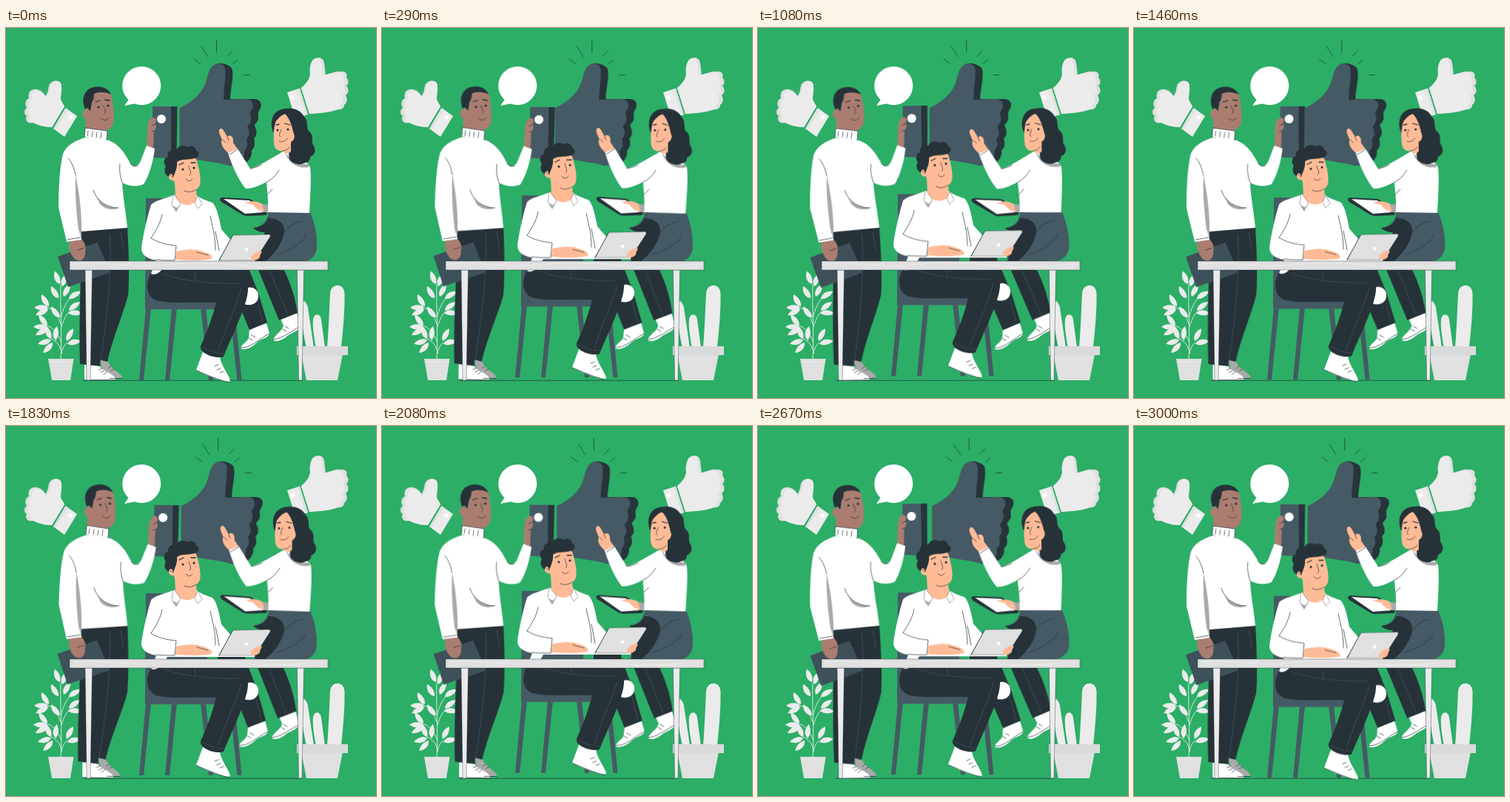
An HTML page that plays this animation: 500x500 px, repeating every 3040 ms.

```html
<!DOCTYPE html>
<html lang="en">
<head>
<meta charset="utf-8">
<title>Team giving a thumbs up</title>
<style>
html, body { margin: 0; width: 100%; height: 100%; overflow: hidden; background: #2cae67; }
svg { display: block; width: 100vw; height: 100vh; }
.white { fill: #fff; }
.pale { fill: #ebebeb; }
.light { fill: #e0e0e0; }
.grey { fill: #a9a9a9; }
.slate { fill: #455a64; }
.dark { fill: #263238; }
.brown { fill: #aa7d70; }
.skin { fill: #ffbb96; }
.ink { fill: none; stroke: #263238; stroke-width: .7; stroke-linecap: round; stroke-linejoin: round; }
.edge { stroke: #263238; stroke-width: .4; stroke-linejoin: round; }
.brow { stroke-width: 1.3; }
.seam { fill: none; stroke: #526570; stroke-width: .5; }

.wind { animation: wind 1520ms linear infinite; }
.man { transform-origin: 151px 277px; }
.woman { transform-origin: 354px 272px; }
.float { animation: float 1520ms linear infinite; }
.slide { animation: slide 3040ms linear infinite; }
@keyframes wind {
  25% { transform: rotate(1deg); }
  75% { transform: rotate(-1deg); }
}
@keyframes float {
  50% { transform: translateY(-9.8px); }
}
@keyframes slide {
  0% { transform: translateX(0); }
  50% { transform: translateX(-3.9px); }
  50.01% { transform: translateX(2.7px); }
  100% { transform: translateX(0); }
}
</style>
</head>
<body>
<svg viewBox="0 0 500 500">
  <defs>
    <pattern id="hatch" width="4" height="4" patternUnits="userSpaceOnUse" patternTransform="rotate(40)">
      <rect width="4" height="4" fill="#263238"/>
      <path d="M0 0V4" stroke="#3a4950" stroke-width=".8"/>
    </pattern>
  </defs>

  <path class="ink" d="M105 476.3H400" stroke-width=".5"/>

  <!-- left small thumb -->
  <path class="light" d="M53 92C57 88 57 82 58 78C60 71 70 69 74 74C77 82 73 92 74 97L79 106L62 134C52 134 42 131 36 128C29 130 25 124 28 119C24 117 24 110 28 108C25 103 26 97 31 95C29 88 33 83 38 83C44 82 50 86 53 92Z"/>
  <path class="pale" d="M54 94C59 90 60 83 61 78C63 72 71 70 74 75C77 82 73 92 74 97L79 106L62 134C52 134 45 131 40 128C33 129 30 124 33 119C29 116 29 110 32 108C30 103 31 97 35 95C34 89 37 85 42 85C47 85 52 88 54 94Z"/>
  <path class="pale" d="M80.500 108L96 119L79 147L64 136Z"/>
  <path class="light" d="M80.500 108L83.500 110L67 138L64 136Z"/>
  <circle class="white" cx="87" cy="121" r="2.700"/>

  <!-- right small thumb -->
  <path class="light" d="M399 81C405 76 411 69 411 62C410 54 412 46 416 42C422 38 429 40 430 47L432 64C440 60 448 58 452 59C459 58 462 62 460 67C464 71 463 76 460 78C464 83 463 88 459 91C462 96 461 101 457 104C457 108 454 110 450 110C438 114 424 115 410 116Z"/>
  <path class="pale" d="M399 81C405 76 411 69 411 62C410 54 412 46 415 43C421 39 426 41 426 48L429 64C437 61 444 60 448 61C454 60 457 64 455 68C459 72 458 77 455 79C459 84 458 88 454 91C457 96 456 100 452 103C452 108 449 109 446 110C436 114 424 115 410 116Z"/>
  <path class="pale" d="M380 87L397 81.500L408 117L391 122Z"/>
  <path class="light" d="M394 82.500L397 81.500L408 117L405 118Z"/>
  <circle class="white" cx="387" cy="94" r="2.800"/>

  <path class="white" d="M160 105L165.500 97A26 26 0 1 1 174 102.300Z"/>

  <g id="plant" class="pale"></g>
  <path class="light" d="M57 447H91.500L87 476H62Z"/>
  <path d="M58 451H91" stroke="#f5f5f5" stroke-dasharray="2 1.500" fill="none"/>

  <!-- cacti -->
  <g class="pale">
    <path d="M406 432C402 415 399 395 399 380C399 366 405 366 408 378L416 432Z"/>
    <path d="M419 432C416 418 414 402 415 394C416 385 425 385 426 394L431 432Z"/>
    <path d="M434 432C436 405 437 380 438 359C439 344 457 344 457.500 359C458 385 455 410 453 432Z"/>
  </g>
  <g fill="none" stroke="#f7f7f7" stroke-dasharray=".7 3.500">
    <path d="M443 430L447 352M449 430L452 356M424 430L421 392"/>
  </g>
  <path class="light" d="M399 441H455L448 476H406Z"/>
  <path fill="#dadada" d="M393 430H462V442H393Z"/>

  <!-- big thumb -->
  <g class="slide">
    <path class="ink" d="M284.500 17V33M264 25L273 39M254 42L262 48M306 31L299 38M313 43L307 48M321 63.500H329"/>
    <path fill="url(#hatch)" d="M283 49C290 46 300 49 305 54C309 64 303 82 303 96L337 96C344 97 347 103 343 110C340 114 341 116 341 120C342 127 336 129 336 132C340 140 339 146 335 149C337 157 336 162 332 165C333 174 328 183 315 185L300 186L280 110Z"/>
    <path class="slate" d="M234.500 108C247 103 264 90 269 76C273 66 273 57 279 51.500C285 46 294 48 296 54C298 64 294 82 294 97L325 96C333 97 336 103 332 111C329 114 330 117 331 120C332 127 328 131 326 133C330 141 329 146 325 150C327 157 326 162 322 166C323 176 318 184 306 186C300 186 295 184 289 183L234.500 174Z"/>
  </g>

  <!-- standing man -->
  <g class="wind man">
    <path class="grey" d="M127 446L137 450C143 463 157 466 157 473H132Z"/>
    <path class="white" d="M106 455L126 456C130 464 146 467 148 474V476H106Z"/>
    <path class="ink" d="M125 462L130 460M128 465L133 463M132 468L136 465M138 460L142 457M142 463L146 461M106 475.500H148M140 473.500H157"/>
    <path class="dark" d="M133 270L164 268C166 300 167 345 165 361C158 388 143 422 137 451L125 448Z"/>
    <path class="dark" d="M102 270H148C148 310 140 360 134 400C130 425 128 440 127 457L100 454C98 390 102 330 102 270Z"/>
    <path class="seam" d="M140 279C144 320 136 400 127 455M155 276L159 300"/>
    <path fill="#3e5059" d="M70 309L123 290L140 330L84 350Z"/>
    <path class="seam" d="M123 290L140 330L84 350"/>
    <path class="brown" d="M86 288L102 285C107 291 109 297 107 301C108 307 105 313 101 314C95 315 91 311 89 307C86 302 84 295 86 288Z"/>
    <path class="ink" d="M97 300L106 297"/>

    <path class="slate" d="M198 106H224V176L198 175Z"/>
    <path fill="url(#hatch)" d="M223 106H231.500L230.500 176H223Z"/>
    <circle class="white" cx="210" cy="123" r="6"/>
    <path class="brown" d="M190 162L191 138C191 129 194 121 199 121C204 122 204 126 201 130C205 132 202 137 200 139L199 163Z"/>
    <path class="ink" d="M201 130L197 132M200 139L197 140"/>

    <path class="white" d="M107 148C94 152 82 158 77 170C72 190 71 222 71 243L82 289L102 286L102 275L164 270C162 248 158 230 157 209C168 215 180 214 186 211C194 198 199 180 201 163L190 159L181 182C177 188 171 188 168 183C161 170 153 156 136 151Z"/>
    <path class="grey" d="M94 199C99 222 103 250 102 285L98 272C95 250 93 222 94 199Z"/>
    <path class="grey" d="M118 219C123 234 136 243 152 243C145 247 133 245 127 238Z"/>
    <path class="ink" d="M118 219C123 234 136 243 152 243M157 209C154 200 153 193 154 184M168 183C170 186 173 188 178 186M94 199C92 188 88 180 84 176M83 286L101 283" stroke-width=".5"/>
    <path class="brown" d="M110 98C112 89 128 82 142 89C145 104 147 117 145 128C143 137 134 140 126 138L107 137C108 130 108 125 107 122C101 120 103 107 110 110Z"/>
    <path class="white" d="M107 135L137 139L136 152C126 151 116 150 106 147Z"/>
    <path class="ink" d="M107 135L137 139L136 152M106 147L107 135M111 139L110 146M117 140L116 147M123 141L122 148M129 141L128 149" stroke-width=".4"/>
    <path class="dark" d="M107 110C102 99 104 87 113 82C121 77 137 78 142 90C134 86 125 86 119 89C119 94 118 98 116 100L114 112L111 109C110 107 108 108 107 110Z"/>
    <path class="ink brow" d="M121 100L127 98M134 97L140 98"/>
    <path class="ink" d="M131 105C134 110 136 114 133 116M128 122C132 126 137 125 139 121"/>
    <circle class="dark" cx="125" cy="107" r="1.600"/><circle class="dark" cx="138" cy="105" r="1.600"/>
  </g>

  <!-- woman -->
  <g class="wind woman">
    <path class="white" d="M329 407L352 399L356 413C355 419 343 420 338 426C331 433 321 436 317 433C318 427 327 424 328 418Z"/>
    <path class="white" d="M371 393L393 385L398 403C394 411 384 412 378 418C370 424 362 424 361 421C364 414 374 409 375 402Z"/>
    <path class="ink" d="M328 419L333 422M332 415L337 418M374 407L379 410M377 403L382 406M317 432C331 433 340 421 356 413M361 421C374 420 386 409 398 403"/>
    <path class="dark" d="M306 320H326L341 358L353 398L329 408C322 390 312 370 306 345Z"/>
    <path class="dark" d="M336 318H371C382 337 390 360 394 385L369 395L341 327Z"/>
    <path class="seam" d="M356 327L381 388M334 347L347 398"/>
    <path class="slate" d="M355 248L411 249C418 266 421 282 420 298C418 310 410 316 396 316H336C338 302 342 290 350 276C344 276 338 274 334 270C344 269 353 263 355 248Z"/>
    <path class="dark" d="M354 257C366 257 377 262 376 276C374 291 362 306 350 316H337C338 300 345 287 350 276C344 276 338 274 334 270C344 269 352 265 354 257Z"/>
    <path class="ink" d="M376 276C381 268 390 263 400 261M366 306C385 300 399 291 405 281"/>

    <path class="dark" d="M289 232Q289 229 293 229L329 231Q333 232 335 235L352 248Q354 253 349 253L326 254Q322 254 319 252L291 235Z"/>
    <path class="white" d="M294 231L329 233L348 249L323 251Z"/>
    <path class="skin" d="M323 236C331 233 342 234 348 239L351 249C344 248 338 245 334 239Z"/>
    <path class="grey" d="M346 238L360 239L360 249L349 249Z"/>

    <path class="skin" d="M303 171C294 164 289 157 292 151C290 146 287 141 288 138C290 134 293 136 295 140L299 147C304 143 308 148 307 155L314 165Z"/>
    <path class="ink" d="M299 147L301 152M293 151L297 155"/>
    <path class="white" d="M374 167C362 174 342 187 330 190L313 163L300 169C305 185 315 207 324 217C334 217 345 212 352 208C353 222 355 236 354 249L410 250C411 228 413 203 411 188C405 178 394 172 386 167Z"/>
    <path class="grey" d="M377 168C384 178 400 185 410 184L409 188C394 191 381 182 377 168Z"/>
    <path class="ink" d="M352 208C360 205 365 198 369 192M330 190C337 189 341 187 345 185M360 218L353 225M302 171L313 164" stroke-width=".5"/>
    <path class="dark" d="M361 141C355 126 361 110 377 109C389 107 398 111 403 120C409 125 405 134 409 139C417 145 412 153 415 158C420 165 417 172 411 174C411 183 404 181 400 184C391 185 385 181 383 177C380 165 386 150 384 137Z"/>
    <path class="skin" d="M364 127C367 119 373 116 378 116C386 121 389 131 388 140C392 145 389 153 385 154L385 167C381 171 375 170 374 166C366 167 362 162 362 154C361 145 362 136 364 127Z"/>
    <path class="dark" d="M361 134C361 121 369 112 380 113C390 120 394 134 390 146C387 137 385 123 377 116C369 119 364 126 361 134Z"/>
    <path class="ink brow" d="M365 131L369 130M377 129L384 131"/>
    <path class="ink" d="M372 137C370 142 368 146 371 147M369 153C374 155 379 152 380 149M374 166C378 166 381 164 383 161M391 153C396 160 394 170 399 176M400 147C401 155 406 160 405 168"/>
    <circle class="dark" cx="367" cy="138" r="1.600"/><circle class="dark" cx="381" cy="137" r="1.600"/>
  </g>

  <!-- seated man -->
  <g class="float">
    <path class="slate" d="M189 230H220V370H188Z"/>
    <path class="slate" d="M189 378H196L186 476H180ZM224 378H231L221 476H215ZM263 378H270L280 476H274ZM302 378H309L318.500 476H312.500ZM188 364H318V380H188Z"/>
    <path class="seam" d="M189 380H316"/>
    <path class="white" d="M322 353C330 347 341 352 341 361C342 371 332 377 322 373Z"/>
    <path class="white" d="M266 438L289 444C290 456 302 469 303 477C299 481 264 467 257 462Z"/>
    <path class="ink" d="M282 457L287 455M285 462L290 460M289 466L294 464M258 463C270 468 288 476 301 479"/>
    <path class="dark" d="M198 328C189 340 187 362 203 368C220 373 254 370 284 371C279 391 270 415 263 430C261 440 284 448 294 444C304 419 321 385 326 362C329 347 326 334 323 316H286V326H272V316H217Z"/>
    <path class="slate" d="M218 315H272V324H210Z"/>
    <path class="seam" d="M212 332C238 342 278 346 315 345M255 331L256 342M265 431C275 437 287 440 295 440M318 352C309 382 295 409 287 436"/>

    <path class="white" d="M226 226C214 231 201 233 196 239C190 258 184 287 183 299C184 309 196 313 203 314L196 332C204 336 213 326 218 316H286L292 306L305 288L291 272C288 256 285 242 279 236C271 233 263 231 258 226Z"/>
    <path class="ink" d="M196 284C205 290 217 293 230 294L228 314C218 314 209 314 202 313M196 284C202 275 209 264 211 252M276 254C279 269 283 280 283 300M283 275L288 301" stroke-width=".5"/>
    <path class="skin" d="M228 207L229 229C235 241 251 243 258 232L257 217Z"/>
    <path class="white edge" d="M226 224L224 239L230 248L236 237ZM259 227L265 238L259 244L255 236Z"/>
    <path class="grey" d="M225 240L230 248L236 238L231 243Z"/>
    <path class="skin" d="M230 302C243 299 256 298 266 302C274 304 280 307 278 312C262 315 246 314 229 313Z"/>
    <path class="ink" d="M258 303L273 307" stroke-width=".5"/>
    <path class="white" d="M231 314H336V316H231Z"/>
    <path class="light edge" d="M306 281Q307 280 309 280L355 279Q358 279 357 282L337 313Q336 314 334 314H288Z"/>
    <path class="ink" d="M288 314L306 281" stroke-width=".5"/>
    <circle class="white" cx="325" cy="299" r="2.400"/>
    <path class="skin" d="M331 309C335 303 342 300 346 302L343 308C345 311 337 315 332 314Z"/>

    <path class="skin" d="M229 181C238 174 252 174 257 177C261 190 264 203 262 212C258 221 248 224 240 220C232 218 228 212 227 206C219 208 217 196 225 195Z"/>
    <path class="dark" d="M220 201C213 198 214 190 216 187C211 181 215 174 219 174C217 167 225 163 230 165C233 158 241 158 245 161C252 157 257 162 257 166C263 167 261 175 255 176C247 179 238 176 231 181C232 189 228 196 226 202C225 196 221 195 220 201Z"/>
    <path class="ink brow" d="M234 185L240 182M250 182L256 182"/>
    <path class="ink" d="M247 187C248 192 252 197 248 199M243 204C246 208 250 207 252 204M222 199L226 202M241 220C247 223 253 221 257 218"/>
    <circle class="dark" cx="239" cy="191" r="1.600"/><circle class="dark" cx="254" cy="189" r="1.600"/>
  </g>

  <!-- table -->
  <path class="pale edge" d="M107 327H116.500L114 476H109ZM393.500 327H402.500L400 476H395.500Z"/>
  <path class="light edge" d="M86 315H435V327H86Z"/>
  <path d="M90 319C130 315 170 325 210 320S290 317 330 322S400 318 431 320M145 325L170 317M340 325C365 317 385 327 428 323" fill="none" stroke="#fff" stroke-width=".6" opacity=".6"/>
</svg>
<script>
// x, y of each leaf's base, then its angle in degrees
const leaves = [
  [73, 346, -112], [76, 349, -68], [71, 365, -122], [78, 363, -62],
  [57, 377, 178], [57, 379, 152], [58, 376, -122], [85, 366, -32],
  [84, 385, 2], [85, 382, -38], [56, 403, 178], [56, 405, 148],
  [56, 402, -128], [67, 422, -85], [61, 420, -112], [61, 421, 162],
  [63, 425, 132], [82, 423, -62], [83, 427, -12], [73, 391, -130]
];
const leaf = ([x, y, a]) =>
  `<path d="M0 0C5-6 13-5 19 0C13 4 5 4 0 0Z" transform="translate(${x} ${y}) rotate(${a})"/>`;
const stems = "M74 447C76 410 73 380 74 346M74 400C70 388 64 380 57 378M74 392C77 380 81 371 86 366M75 404C78 394 81 388 85 384M75 425C70 412 63 404 56 403M75 440C74 429 68 423 61 420M75 440C76 433 79 428 83 425";
document.getElementById("plant").innerHTML =
  `<path d="${stems}" fill="none" stroke="#ebebeb" stroke-width=".9"/>` + leaves.map(leaf).join("");
</script>
</body>
</html>
```
